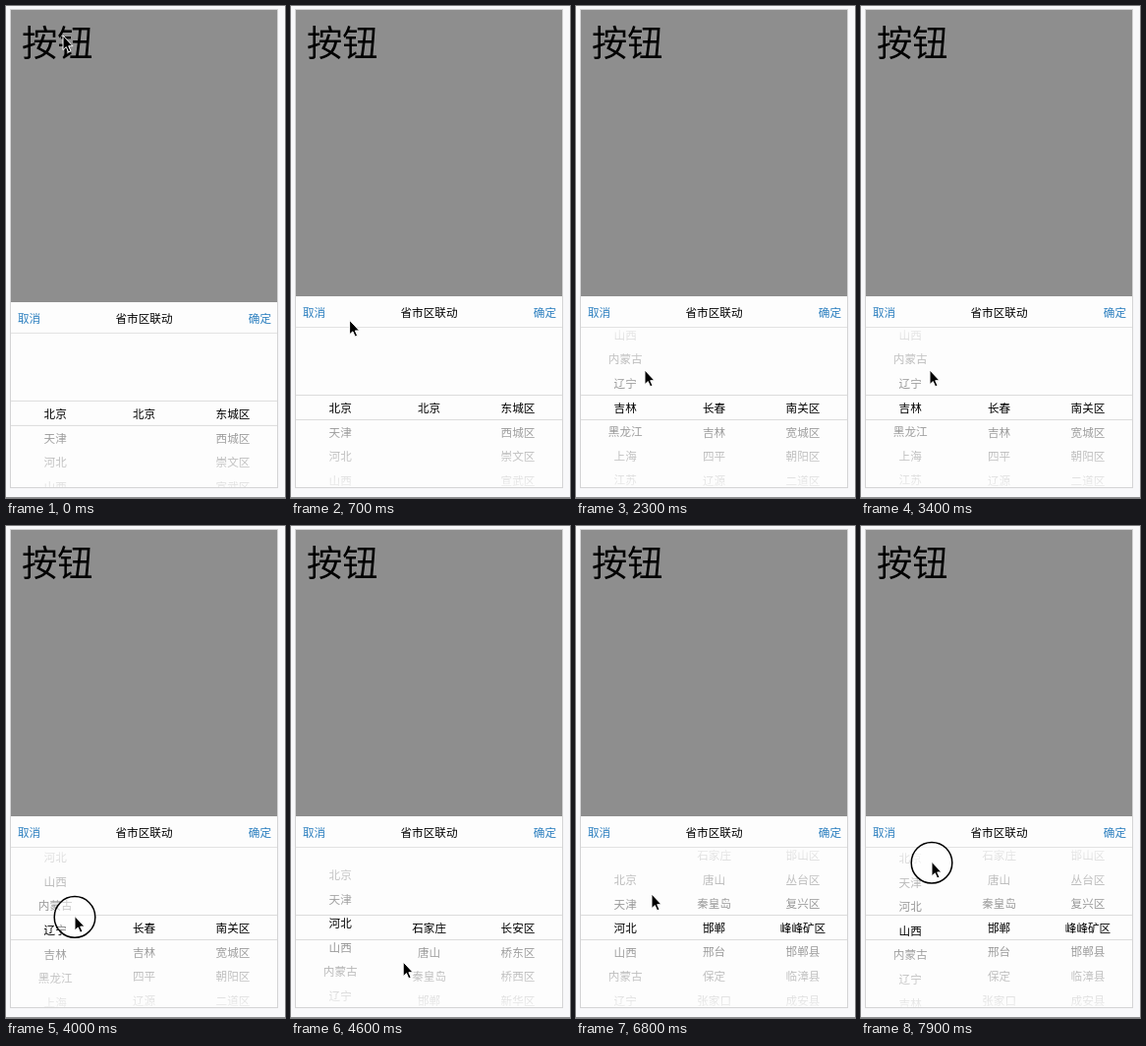
An HTML page that plays this animation: 284x500 px, repeating every 8000 ms.

```html
<!DOCTYPE html>
<html lang="zh-CN">
<head>
<meta charset="utf-8">
<title>省市区联动</title>
<style>
  html, body { margin: 0; width: 100%; height: 100%; overflow: hidden; }
  body {
    position: relative; background: #f8f8fa; color: #000;
    font: 11.6px/24.6px "Noto Sans CJK SC", "Noto Sans CJK", "Noto Sans", sans-serif;
  }
  body > *, .screen > *, .panel > *, .wheel > * { position: absolute; }
  .screen {
    left: 4px; top: 3px; width: 271px; height: 485px; overflow: hidden;
    background: #8e8e8e; border: 1px solid #d4d4d5;
  }
  .button { left: 11px; top: 7px; font-size: 36.3px; line-height: 48px; white-space: nowrap; }
  .panel {
    left: 0; top: 290.5px; width: 271px; height: 196px; background: #fdfdfd;
    animation: rise 8s infinite;
  }
  @keyframes rise {
    0% { transform: translateY(6px); animation-timing-function: ease-out; }
    1.25%, 100% { transform: none; }
  }
  .head { left: 0; top: 0; width: 271px; height: 31.5px; line-height: 32px; border-bottom: 1px solid #e2e2e2; text-align: center; }
  .head span { position: absolute; top: 0; color: #2c7fbf; }
  .wheel { left: 0; top: 32.5px; width: 271px; height: 162px; overflow: hidden; }
  .col { top: 69px; width: 90.4px; text-align: center; white-space: nowrap; }
  .mask { left: 0; width: 271px; height: 68px; }
  .upper { top: 0; border-bottom: 1px solid #dcdcdc; background: linear-gradient(#fdfdfdf0, #fdfdfd8c); }
  .lower { bottom: 0; border-top: 1px solid #dcdcdc; background: linear-gradient(#fdfdfd8c, #fdfdfdf0); }
  .edge { left: 0; bottom: 0; width: 100%; height: 1px; background: #8d8e90; }
  .pointer { left: 0; top: 0; overflow: visible; }
</style>
</head>
<body>
<div class="screen">
  <div class="button">按钮</div>
  <div class="panel">
    <div class="head"><span style="left:7px">取消</span>省市区联动<span style="right:6px">确定</span></div>
    <div class="wheel">
      <div class="col" style="left:0"></div>
      <div class="col" style="left:90.4px"></div>
      <div class="col" style="left:180.8px"></div>
      <div class="mask upper"></div>
      <div class="mask lower"></div>
    </div>
  </div>
</div>
<div class="edge"></div>
<svg class="pointer" width="1" height="1">
  <g id="pointer">
    <circle id="ring" r="20.8" fill="#fff" fill-opacity=".5" stroke="#000" stroke-width="1.5"/>
    <path d="M0 -1V13.6L3.3 10.6L5.6 15.8L8 14.7L5.7 9.7H10Z" fill="#000" stroke="#fff" stroke-width="1" stroke-linejoin="round"/>
  </g>
</svg>
<script>
const LOOP = 8000, ROW = 24.6, TRAVEL = 700, SETTLE = 800;

const opening = [
  '北京 天津 河北 山西 内蒙古 辽宁 吉林 黑龙江 上海 江苏 浙江 安徽',
  '北京',
  '东城区 西城区 崇文区 宣武区 朝阳区'
];

// The pointer visits these stops. A stop with a column drags it by dy,
// then the column settles on a row and refills the columns after it.
const stops = [
  { from: 0, to: 200, x: 58, y: 31 },
  { from: 950, to: 1400, x: 60, y: 391, dy: -105, col: 0, row: 6,
    fill: ['长春 吉林 四平 辽源 通化', '南关区 宽城区 朝阳区 二道区 绿园区'] },
  { from: 3850, to: 4250, x: 70, y: 371, dy: 70, col: 0, row: 2,
    fill: ['石家庄 唐山 秦皇岛 邯郸 邢台 保定 张家口 承德', '长安区 桥东区 桥西区 新华区 裕华区'] },
  { from: 4950, to: 5200, x: 158, y: 447, dy: -64, col: 1, row: 3,
    fill: ['邯山区 丛台区 复兴区 峰峰矿区 邯郸县 临漳县 成安县 大名县'] },
  { from: 5950, to: 6200, x: 225, y: 409, dy: -64, col: 2, row: 3 },
  { from: 6800, to: 6850, x: 77, y: 375 },
  { from: 7600, to: 8000, x: 72, y: 364, dy: -29, col: 0, row: 3 }
];

const clamp = p => Math.min(1, Math.max(0, p));
const smooth = p => p * p * (3 - 2 * p);
const mix = (a, b, p) => a + (b - a) * p;

function pointerAt(t) {
  const i = stops.findLastIndex(s => s.from <= t);
  const s = stops[i], next = stops[i + 1];
  const endY = s.y + (s.dy || 0);
  if (t <= s.to || !next) return [s.x, mix(s.y, endY, (t - s.from) / (s.to - s.from))];
  const p = smooth(clamp((t - s.to) / Math.min(TRAVEL, next.from - s.to)));
  return [mix(s.x, next.x, p), mix(endY, next.y, p)];
}

function wheelsAt(t) {
  const rows = [0, 0, 0], names = [...opening];
  for (const s of stops) {
    if (s.col === undefined || t < s.from) continue;
    const drag = clamp((t - s.from) / (s.to - s.from));
    const rest = (1 - clamp((t - s.to) / SETTLE)) ** 3;
    const dragged = rows[s.col] - s.dy * drag / ROW;
    rows[s.col] = t < s.to ? dragged : mix(s.row, dragged, rest);
    if (t >= s.to && s.fill) s.fill.forEach((list, i) => { names[s.col + 1 + i] = list; });
  }
  return { rows, names };
}

const pointer = document.getElementById('pointer');
const ring = document.getElementById('ring');
const cols = [...document.querySelectorAll('.col')];
const panel = document.querySelector('.panel');
const shown = [];

function draw(t) {
  const { rows, names } = wheelsAt(t);
  cols.forEach((col, c) => {
    if (shown[c] !== names[c]) {
      shown[c] = names[c];
      col.innerHTML = names[c].split(' ').map(n => `<div>${n}</div>`).join('');
    }
    col.style.transform = `translateY(${-rows[c] * ROW}px)`;
  });
  pointer.setAttribute('transform', `translate(${pointerAt(t).join(' ')})`);
  const down = stops.some(s => s.dy && t >= s.from - 50 && t < s.to);
  ring.setAttribute('visibility', down ? 'visible' : 'hidden');
}

const start = performance.now();
function tick() {
  draw((performance.now() - start) % LOOP);
  requestAnimationFrame(tick);
}
tick();
</script>
</body>
</html>
```
